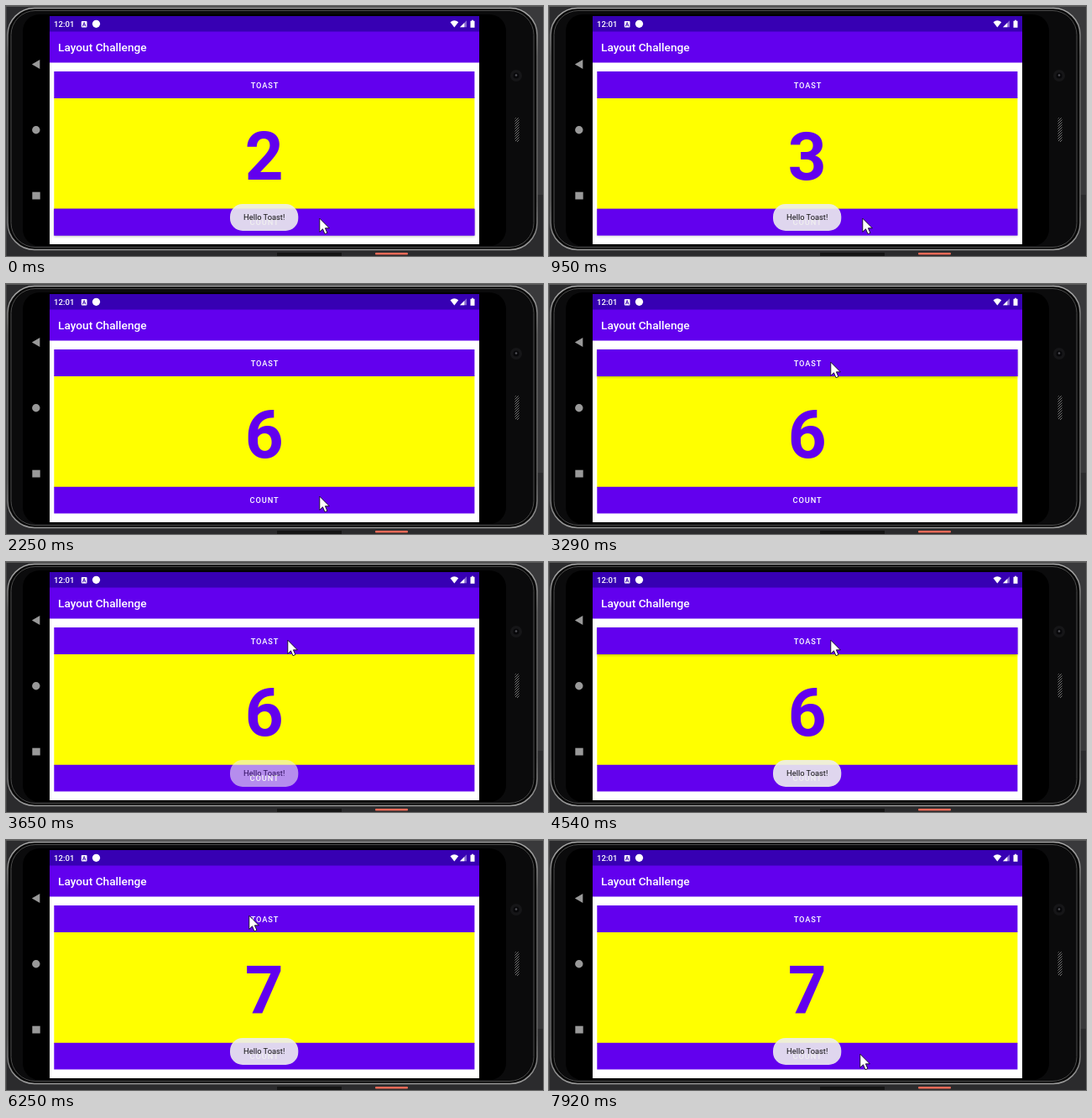
An HTML page for the animation above (8 s loop, 640 by 298 pixels).

```html
<!DOCTYPE html>
<html lang="en">
<head>
<meta charset="utf-8">
<title>Layout Challenge</title>
<style>
html, body { margin: 0; width: 100%; height: 100%; overflow: hidden; background: #303030; }
svg { display: block; width: 640px; height: 298px; }
text { font-family: Roboto, "Noto Sans", sans-serif; }
.medium { font-weight: 500; fill: #fff; }
.button { font-size: 9.3px; letter-spacing: .84px; text-anchor: middle; }
.digits text { font-size: 80px; font-weight: 700; fill: #6200ee; text-anchor: middle; }

/* Every part jumps between states; percentages are ms / 80. */
.digits, .toast, .press, .cursor { animation: 8s step-end infinite; }
.digits { animation-name: count; }
.toast { animation-name: toast; }
.press { filter: drop-shadow(0 1px 1.8px rgba(0, 0, 0, .3)); }
.press.top { animation-name: press-top; }
.press.bottom { animation-name: press-bottom; }
.cursor { animation-name: point; }

@keyframes count {
  0% { transform: translateY(0); }
  3.375% { transform: translateY(-150px); }
  14.875% { transform: translateY(-300px); }
  23.25% { transform: translateY(-450px); }
  28.125% { transform: translateY(-600px); }
  71.5%, 100% { transform: translateY(-750px); }
}
@keyframes toast {
  0% { opacity: 1; }
  14.875% { opacity: .5; }
  16.75% { opacity: 0; }
  45.625% { opacity: .66; }
  47.125% { opacity: .9; }
  48.625%, 100% { opacity: 1; }
}
@keyframes press-top {
  0% { opacity: 0; }
  41.125% { opacity: 1; }
  44.125% { opacity: 0; }
  56.75% { opacity: 1; }
  60.125% { opacity: 0; }
  86% { opacity: 1; }
  89.375%, 100% { opacity: 0; }
}
@keyframes press-bottom {
  0% { opacity: 1; }
  3.375% { opacity: 0; }
  11.875% { opacity: .6; }
  13.375% { opacity: 1; }
  14.875% { opacity: 0; }
  20.125% { opacity: 1; }
  23.25% { opacity: 0; }
  25.125% { opacity: .6; }
  26.625% { opacity: 1; }
  28.125% { opacity: 0; }
  68.5% { opacity: .6; }
  70% { opacity: 1; }
  71.5%, 100% { opacity: 0; }
}
@keyframes point {
  0% { transform: translate(374px, 254px); }
  33.125% { transform: translate(356px, 170px); }
  34.625% { transform: translate(341px, 100px); }
  36.5% { transform: translate(336px, 94px); }
  60.125% { transform: translate(349px, 163px); }
  62% { transform: translate(366px, 226px); }
  64% { transform: translate(372px, 245px); }
  65.5% { transform: translate(374px, 248px); }
  74.75% { transform: translate(326px, 169px); }
  76.625% { transform: translate(300px, 110px); }
  78.125% { transform: translate(290px, 91px); }
  91.125% { transform: translate(330px, 200px); }
  92.75% { transform: translate(368px, 282px); }
  96% { transform: translate(370px, 274px); }
  97.5% { transform: translate(371px, 262px); }
  99%, 100% { transform: translate(371px, 256px); }
}
</style>
</head>
<body>
<svg viewBox="0 0 640 298">
  <defs>
    <clipPath id="panel"><path d="M57 110H558V242H57Z"/></clipPath>
    <pattern id="mesh" width="3" height="3" patternUnits="userSpaceOnUse">
      <path d="M0 3L3 0" stroke="#777"/>
    </pattern>
    <linearGradient id="rim" x2="0" y2="1">
      <stop offset="0" stop-color="#aaa"/>
      <stop offset=".2" stop-color="#666"/>
      <stop offset=".8" stop-color="#666"/>
      <stop offset="1" stop-color="#999"/>
    </linearGradient>
  </defs>

  <!-- phone body -->
  <path d="M0 0H640V298H0Z" fill="#2b2b2d"/>
  <path d="M600 0H640V225H600Z" fill="#39393b"/>
  <path d="M0 298V.5H640" fill="none" stroke="#5a5a5a"/>
  <path d="M323 294H400V298H323Z" fill="#141414"/>
  <rect x="440" y="294" width="39" height="2.500" rx="1" fill="#ee6a58"/>
  <rect x="2" y="2.500" width="631" height="288" rx="32" fill="#080808" stroke="url(#rim)" stroke-width="1.500"/>
  <rect x="6" y="5.500" width="623" height="282" rx="29" fill="#0b0b0c" stroke="#4a4a4a"/>
  <rect x="20" y="10" width="576" height="276" rx="20"/>
  <circle cx="608" cy="83" r="7" fill="#161618"/>
  <circle cx="608" cy="83" r="3.500" fill="#08080a"/>
  <circle cx="608" cy="82.500" r="1.300" fill="#505056"/>
  <rect x="606.500" y="133" width="5" height="29" rx="2" fill="url(#mesh)"/>
  <g fill="#999">
    <path d="M30.800 69.500L40.300 64V75Z"/>
    <circle cx="35.800" cy="147.700" r="4.700"/>
    <path d="M31.300 221.700H40.700V230.500H31.300Z"/>
  </g>

  <!-- app screen -->
  <path d="M52 67H564V284H52Z" fill="#fff"/>
  <path d="M52 12H564V31H52Z" fill="#3700b3"/>
  <path d="M52 30.400H564V67.500H52Z" fill="#6200ee"/>
  <text class="medium" x="57" y="25" font-size="9.6">12:01</text>
  <rect x="89.800" y="18" width="6.700" height="7.500" rx="1" fill="#fff"/>
  <path d="M91.300 24.300L93.150 19.500L95 24.300M92 22.800H94.300" fill="none" stroke="#3700b3" stroke-width=".9"/>
  <circle cx="107.500" cy="21.300" r="4.600" fill="#fff"/>
  <g fill="#fff">
    <path d="M529.500 19.300Q534.300 15 539.200 19.300L534.300 25.500Z"/>
    <path d="M549 17.300V25.300H541Z" opacity=".4"/>
    <path d="M546.300 20V25.300H541Z"/>
    <path d="M553.500 17.800H555V16.800H557V17.800H558.500V25.800H553.500Z"/>
  </g>
  <text class="medium" x="62" y="54" font-size="13.7">Layout Challenge</text>

  <path d="M57.300 109H558.400V243H57.300Z" fill="#ff0"/>
  <g clip-path="url(#panel)">
    <g class="digits">
      <text x="307.700" y="206.800">2</text>
      <text x="307.700" y="356.800">3</text>
      <text x="307.700" y="506.800">4</text>
      <text x="307.700" y="656.800">5</text>
      <text x="307.700" y="806.800">6</text>
      <text x="307.700" y="956.800">7</text>
    </g>
  </g>
  <g fill="#6200ee">
    <path class="press top" d="M57.300 78H558.400V110H57.300Z"/>
    <path class="press bottom" d="M57.300 241.700H558.400V273.400H57.300Z"/>
    <path d="M57.300 78H558.400V110H57.300ZM57.300 241.700H558.400V273.400H57.300Z"/>
  </g>
  <text class="medium button" x="308.500" y="97.500">TOAST</text>
  <text class="medium button" x="308" y="261.300">COUNT</text>

  <g class="toast">
    <rect x="267" y="236" width="81.300" height="32" rx="15" fill="#eee" fill-opacity=".9"/>
    <text x="307.700" y="255.300" font-size="9.3" text-anchor="middle" fill="#111">Hello Toast!</text>
  </g>

  <path class="cursor" d="M-.2 -.8V15.300L3.500 11.800L6 17.700L8.900 16.500L6.400 10.800H11.300Z" fill="#fff" stroke="#000" stroke-width=".8"/>
</svg>
</body>
</html>
```
